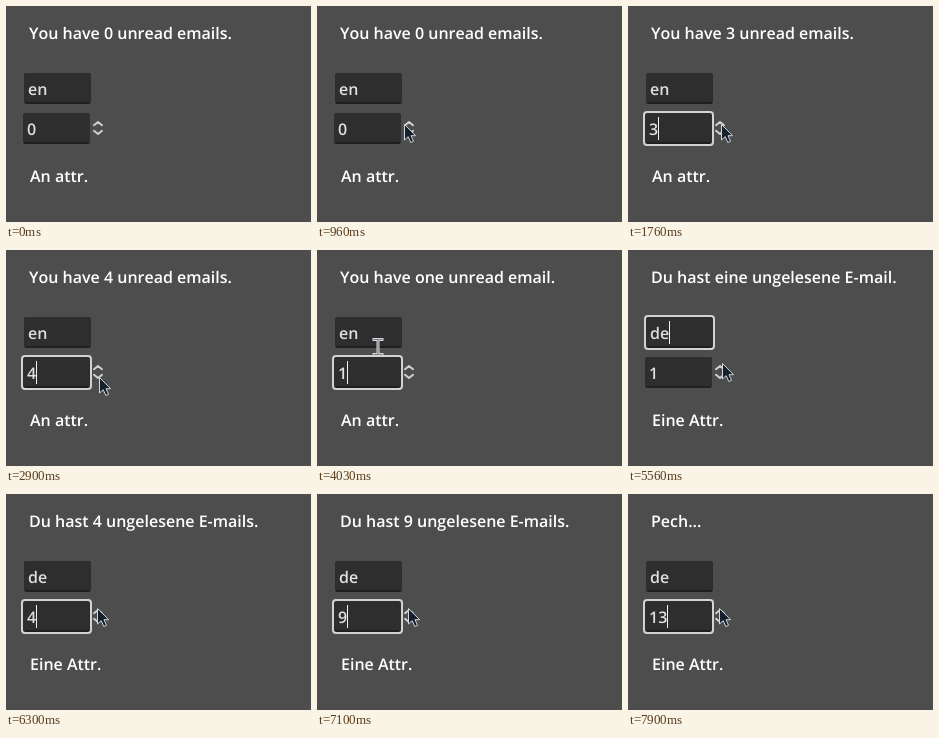
An HTML page that plays this animation: 305x216 px, repeating every 8 s.

```html
<!DOCTYPE html>
<html lang="en">
<head>
<meta charset="utf-8">
<title>Plural translation demo</title>
<style>
  html, body { margin: 0; width: 100%; height: 100%; overflow: hidden; background: #4d4d4d; }
  svg { display: block; width: 100vw; height: 100vh; }
  text { font: 600 16px "Open Sans", "Noto Sans", sans-serif; font-kerning: none; fill: #fff; text-rendering: geometricPrecision; white-space: pre; }
  .field text { fill: #dfdfdf; }
  .focus { fill: none; stroke: #d2d2d2; stroke-width: 2; }
  .caret { fill: #f2f2f2; }
  .sel { fill: #808080; }
</style>
</head>
<body>
<svg viewBox="0 0 305 216">
  <defs>
    <g id="box">
      <rect width="67" height="31" rx="3" fill="#1f1f1f"/>
      <path d="M0 29V3a3 3 0 0 1 3-3H64a3 3 0 0 1 3 3V29Z" fill="#2e2e2e"/>
    </g>
  </defs>
  <rect width="305" height="216" fill="#4d4d4d"/>
  <text id="message" x="23" y="33"></text>
  <g class="field" id="locale" transform="translate(18 67)"></g>
  <g class="field" id="count" transform="translate(17 107)"></g>
  <path d="M88 119.2L92 116L96 119.2M88 124.8L92 128L96 124.8" fill="none" stroke="#d0d0d0" stroke-width="2" stroke-linecap="round" stroke-linejoin="round"/>
  <text id="attr" x="24" y="176"></text>
  <path id="arrow" d="M.5 .5V16L4.2 12.7L6.8 18.5L9.5 17.3L7 11.7H11.6Z" fill="#16202c" stroke="#d0d6dc" stroke-linejoin="round"/>
  <g id="beam" fill="none">
    <path d="M-5.5 -7.5H5.5M0 -7.5V7.5M-5.5 7.5H5.5" stroke="#d6d6d6" stroke-width="3"/>
    <path d="M-4.5 -7.5H4.5M0 -7.5V7.5M-4.5 7.5H4.5" stroke="#75808c" stroke-width="1.1"/>
  </g>
</svg>
<script>
const LOOP = 8000, TICK = 200 / 3;
const ENTER = 500, COUNT_UP = 1230, DRAG = 4160, TYPE = 4760, COUNT_AGAIN = 5760;
const $ = id => document.getElementById(id);
const clamp = (v, lo, hi) => Math.min(hi, Math.max(lo, v));

// Bursts of evenly spaced clicks on the spinner
const bursts = [
  { from: COUNT_UP, gap: 200, clicks: 2, step: 1 },
  { from: 1760, gap: 180, clicks: 4, step: 1 },
  { from: 2700, gap: 170, clicks: 4, step: -1 },
  { from: 3560, gap: 1, clicks: 1, step: -1 },
  { from: COUNT_AGAIN, gap: 1, clicks: 1, step: 1 },
  { from: 6100, gap: 160, clicks: 9, step: 1 },
  { from: 7630, gap: 270, clicks: 2, step: 1 },
];

// Pointer moves: start, end, destination
const entry = [222, 133];
const moves = [
  [ENTER, 766, 84, 118],
  [900, 1100, 93, 118],
  [2300, 2433, 93, 127],
  [3833, 4133, 45, 82],
  [4133, 4300, 16, 84],
  [4433, 4766, 108, 100],
  [4900, 5100, 108, 108],
  [5300, 5633, 91, 114],
];

const countAt = t => bursts.reduce((n, b) =>
  n + b.step * clamp(Math.floor((t - b.from) / b.gap) + 1, 0, b.clicks), 0);

const localeAt = t => t < TYPE ? "en" : "de".slice(0, 1 + Math.floor((t - TYPE) / 70));

// Dragging leftwards selects one more letter per tick
const selectedAt = t => t < TYPE ? clamp(Math.floor((t - DRAG) / 70), 0, 2) : 0;

function focusAt(t) {
  if (t < COUNT_UP) return "";
  return t >= DRAG && t < COUNT_AGAIN ? "locale" : "count";
}

function pointerAt(t) {
  return moves.reduce(([px, py], [start, end, x, y]) => {
    const k = clamp((t - start) / (end - start), 0, 1);
    return [px + (x - px) * k, py + (y - py) * k];
  }, entry).map(Math.round);
}

function show(el, on) { el.setAttribute("visibility", on ? "visible" : "hidden"); }

function makeField(id) {
  $(id).innerHTML = `<use href="#box"/><rect class="sel" y="4" height="23"/>
    <text x="4" y="22"></text><rect class="caret" y="4" width="1" height="23"/>
    <rect class="focus" x="-1" y="-1" width="69" height="33" rx="3"/>`;
  const part = s => $(id).querySelector(s);
  const label = part("text"), sel = part(".sel"), caret = part(".caret"), ring = part(".focus");
  return (value, focused, selected = 0) => {
    label.textContent = value;
    const end = 4 + label.getComputedTextLength();
    const cut = value.length - selected;
    const start = cut ? 4 + label.getSubStringLength(0, cut) : 4;
    sel.setAttribute("x", start);
    sel.setAttribute("width", end - start);
    caret.setAttribute("x", Math.round(start));
    show(caret, focused);
    show(ring, focused);
  };
}

function message(german, n) {
  if (german) {
    if (n === 13) return "Pech...";
    return n === 1 ? "Du hast eine ungelesene E-mail." : `Du hast ${n} ungelesene E-mails.`;
  }
  return n === 1 ? "You have one unread email." : `You have ${n} unread emails.`;
}

const setLocale = makeField("locale"), setCount = makeField("count");

function draw(t) {
  const n = countAt(t), locale = localeAt(t), focus = focusAt(t);
  const german = locale === "de";
  $("message").textContent = message(german, n);
  $("attr").textContent = german ? "Eine Attr." : "An attr.";
  setLocale(locale, focus === "locale", selectedAt(t));
  setCount(String(n), focus === "count");

  // The pointer is sampled 15 times a second
  const [x, y] = pointerAt(Math.floor((t - 25) / TICK) * TICK + TICK / 2);
  const overField = x < 86 && (y >= 67 && y < 98 || y >= 107 && y < 138);
  for (const id of ["arrow", "beam"]) {
    $(id).setAttribute("transform", `translate(${x} ${y})`);
    show($(id), t >= ENTER && overField === (id === "beam"));
  }
}

const begin = performance.now();
function frame() {
  draw((performance.now() - begin) % LOOP);
  requestAnimationFrame(frame);
}
frame();
</script>
</body>
</html>
```
